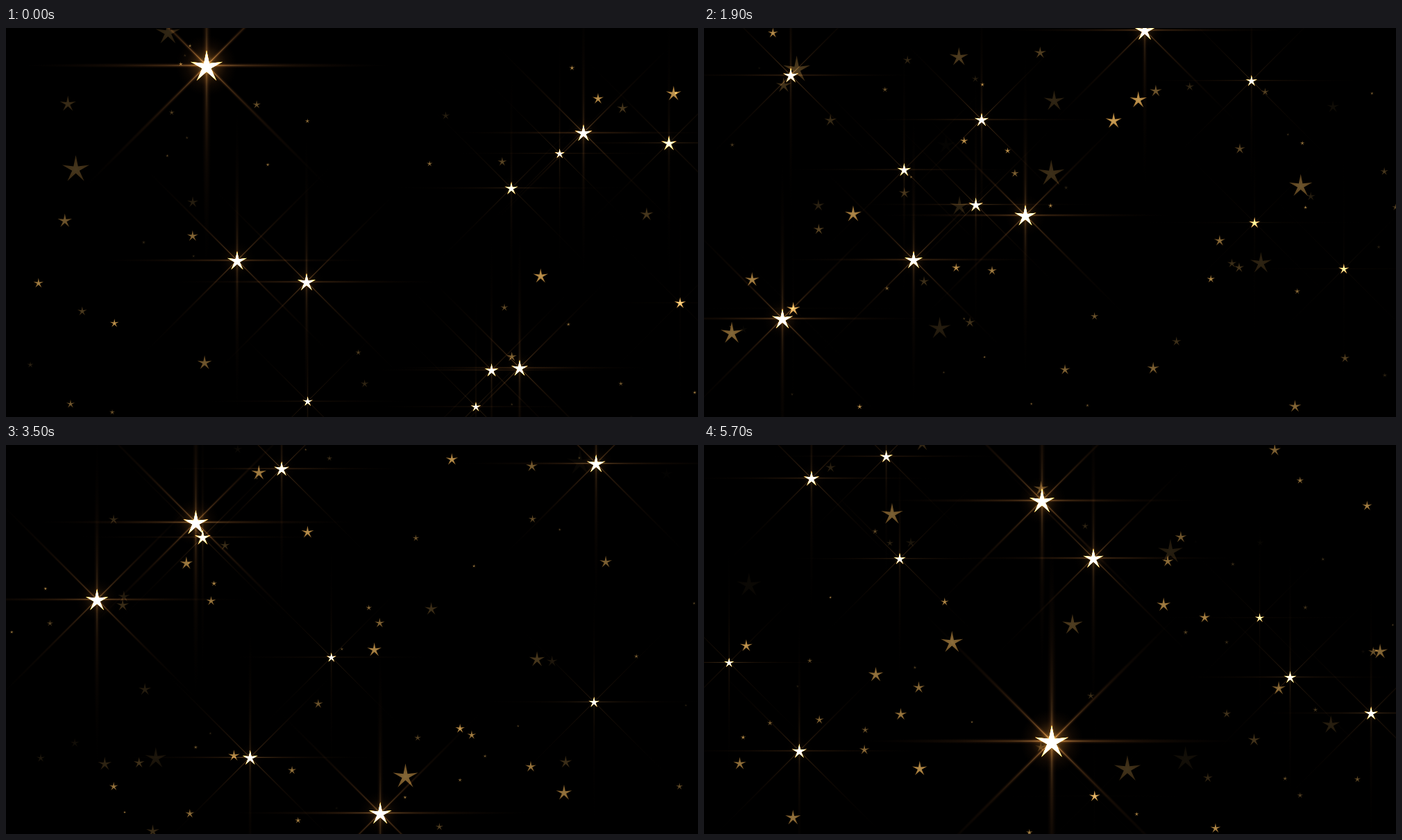
An HTML page with a canvas for the animation above (5800 ms loop, 997x561 px).

```html
<!DOCTYPE html>
<html lang="en">
<head>
<meta charset="utf-8">
<title>Golden stars</title>
<style>
  html, body { margin: 0; width: 100%; height: 100%; overflow: hidden; background: #000; }
  canvas { display: block; }
</style>
</head>
<body>
<canvas id="sky" width="997" height="561"></canvas>
<script>
const W = 997, H = 561, LOOP = 5800, STEP = 100;
const ctx = document.getElementById('sky').getContext('2d');
const clamp = v => Math.max(0, Math.min(1, v));
const mix = (a, b, u) => a + (b - a) * u;

let seed = 4711;
const rand = () => (seed = (seed * 16807) % 2147483647) / 2147483647;
const between = (a, b) => mix(a, b, rand());

// Each star drifts from one point to another, fading in before and out after.
const stars = [];
function add(start, end, fade, glow, x, y, x1, y1, size, size1 = size) {
  stars.push({ start, end, fade, glow, x, y, x1, y1, size, size1 });
}
const leads = (start, end, rows) => rows.forEach(row => add(start, end, 700, 1, ...row));

leads(0, 700, [
  [289, 54, 382, 45, 46], [433, 366, 406, 356, 26], [832, 151, 854, 151, 25],
  [740, 490, 588, 530, 24, 50], [333, 335, 311, 356, 28]
]);
leads(1900, 2800, [
  [635, 3, 583, 35, 29], [463, 270, 457, 311, 31], [113, 419, 12, 414, 30],
  [302, 334, 362, 408, 26], [400, 132, 354, 41, 20, 34], [125, 68, 95, 97, 22, 42]
]);
leads(4200, 5000, [
  [559, 28, 618, 232, 60, 26], [266, 352, 220, 527, 38, 22], [87, 324, 45, 395, 36, 13],
  [720, 24, 814, 38, 33, 14], [590, 515, 650, 485, 26], [569, 284, 572, 306, 24],
  [843, 548, 785, 502, 24]
]);
leads(5000, 5700, [
  [431, 60, 487, 80, 0, 36], [600, 200, 561, 163, 0, 29], [530, 380, 501, 427, 0, 48]
]);

// The rest of the sky is seeded; larger stars drift faster.
function scatter(start, life, fade, size, glow) {
  const x = rand() * W, y = rand() * H, drift = 14 + size;
  add(start, start + life, fade, glow, x, y,
      x + between(-drift, drift), y + between(-drift, drift), size);
}
const anyTime = () => between(-1000, LOOP + 300);
for (let i = 0; i < 30; i++) scatter(anyTime(), 900, 500, between(13, 23), between(.88, 1));
for (let i = 0; i < 80; i++) {
  const size = 16 + 26 * rand() ** 2;
  scatter(anyTime(), 900, 500, size, between(.2, .76) - (size - 16) / 120);
}
for (let i = 0; i < 170; i++)
  scatter(anyTime(), 900, 500, 4 + 12 * rand() ** 1.4, between(.12, .68));
for (let i = 0; i < 12; i++)
  scatter(i % 2 ? 1230 : 3430, 140, 520, between(20, 36), 1);

// Gradient of evenly spaced colours from the centre outwards.
function radial(...colours) {
  const g = ctx.createRadialGradient(0, 0, 0, 0, 0, 1);
  colours.forEach((c, i) => g.addColorStop(i / (colours.length - 1), c));
  return g;
}
const rayFill = radial('#ffbe69', '#b46e3080', '#82481c40', '#5f321420', '#3c1e0a00');
const haloFill = radial('#ffcd6ee6', '#d7872d66', '#96501a22', '#64320a00');
const hotFill = radial('#fff', '#fffbe8', '#ffdf9a', '#eeb256');
const goldFill = radial('#f3c06a', '#dfa650', '#c0883a');

const shape = new Path2D();
for (let i = 0; i < 10; i++) {
  const r = i % 2 ? .27 : 1, a = i * Math.PI / 5 - Math.PI / 2;
  shape.lineTo(r * Math.cos(a), r * Math.sin(a));
}
shape.closePath();

function blob(x, y, angle, length, width, fill, alpha) {
  ctx.save();
  ctx.translate(x, y);
  ctx.rotate(angle);
  ctx.scale(length, width);
  ctx.globalAlpha = clamp(alpha);
  ctx.fillStyle = fill;
  ctx.fillRect(-1, -1, 2, 2);
  ctx.restore();
}

function drawStar(x, y, size, level) {
  const hot = clamp((level - .7) / .3);
  if (hot > 0) {
    const power = hot * clamp(.14 + size / 75), reach = 95 + size * 3.4;
    const ray = (angle, length, width, alpha) =>
      blob(x, y, angle, reach * length, size * width, rayFill, power * alpha);
    ray(0, 1.05, .09, .9);
    ray(Math.PI / 2, 1.15, .15, .5);
    ray(Math.PI / 4, 1, .08, .75);
    ray(-Math.PI / 4, 1, .08, .75);
    blob(x, y, 0, size * .95, size * .95, haloFill, hot * (size / 58) ** 2);
  }
  const paint = (fill, alpha) => {
    ctx.globalAlpha = clamp(alpha);
    ctx.fillStyle = fill;
    ctx.fill(shape);
  };
  ctx.save();
  ctx.translate(x, y + size * .05);
  ctx.scale(size * .53, size * .53);
  paint(goldFill, level * 1.2);
  if (hot > 0) paint(hotFill, hot);
  ctx.restore();
}

function render(t) {
  ctx.globalCompositeOperation = 'source-over';
  ctx.globalAlpha = 1;
  ctx.fillStyle = '#000';
  ctx.fillRect(0, 0, W, H);
  ctx.globalCompositeOperation = 'lighter';
  for (const s of stars) {
    const away = Math.max(s.start - t, t - s.end, 0) / s.fade;
    if (away >= 1) continue;
    const u = (t - s.start) / (s.end - s.start);
    const size = mix(s.size, s.size1, clamp(u));
    if (size > .5)
      drawStar(mix(s.x, s.x1, u), mix(s.y, s.y1, u), size, s.glow * (1 - away * away));
  }
}

function tick() {
  render(Math.floor(performance.now() % LOOP / STEP) * STEP);
  requestAnimationFrame(tick);
}
tick();
</script>
</body>
</html>
```
